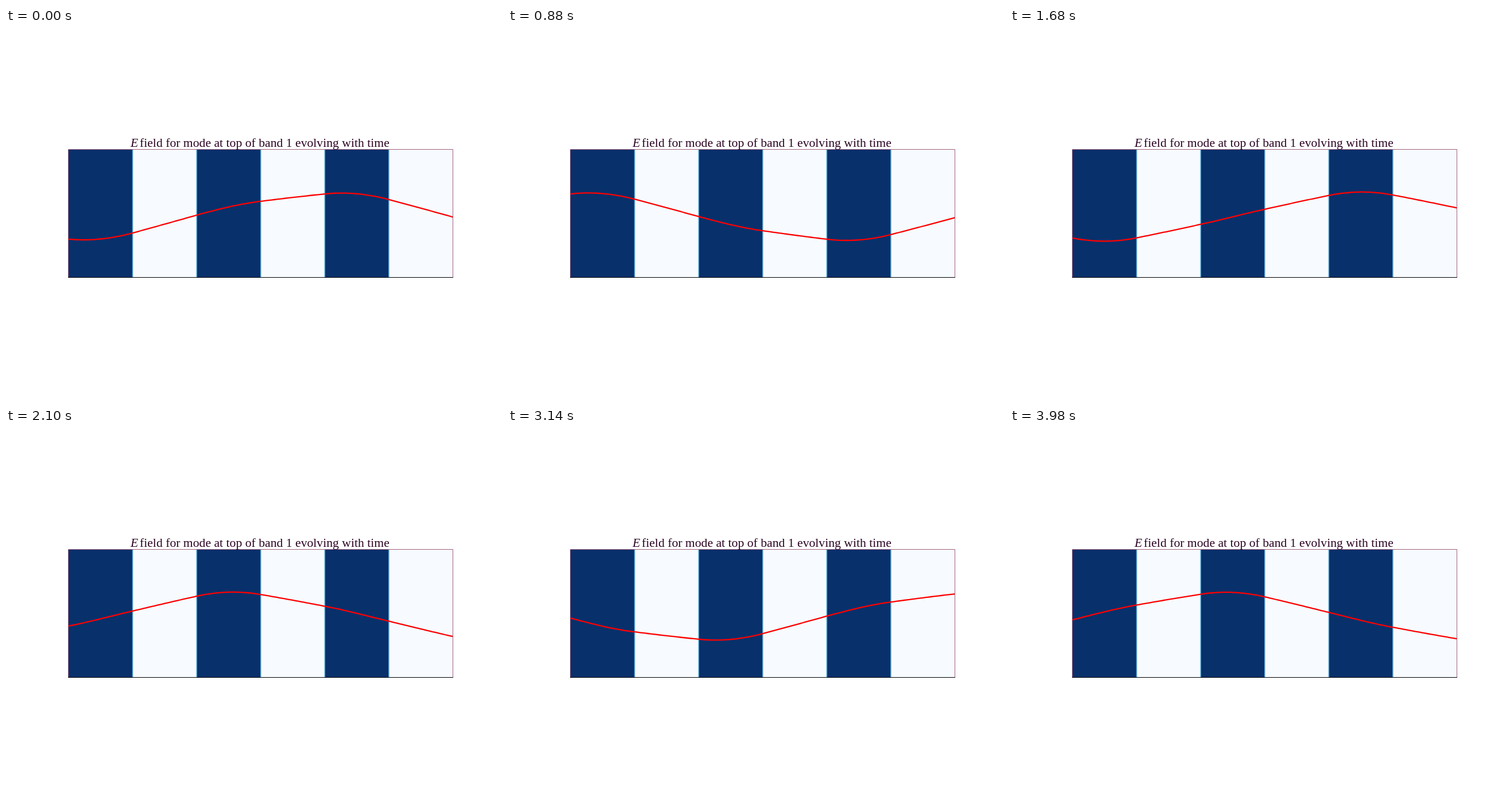
Animation, 864 px wide and 648 px high, one loop 4000 ms. Source, as an HTML page:

```html
<!DOCTYPE html>
<html>
<head>
<meta charset="utf-8">
<style>
html, body { margin: 0; width: 100%; height: 100%; overflow: hidden; background: #fff; }
svg { display: block; }
text { font: 21.7px "Liberation Serif", "Times New Roman", serif; fill: #2c0424; }
.it { font-style: italic; }
</style>
</head>
<body>
<svg width="864" height="648" viewBox="0 0 864 648">
  <rect x="108.8" y="211" width="669.5" height="223.5" fill="#f7fbff"/>
  <g id="layers"></g>
  <path id="wave" fill="none" stroke="#f00" stroke-width="2.3" stroke-linejoin="round"/>
  <path d="M108.5 434V211.5H778.5V434" fill="none" stroke="#a0607c"/>
  <path d="M108 434.5H779" stroke="#000"/>
  <text y="206.5"><tspan x="217" class="it">E</tspan><tspan x="233">field for mode at top of band 1 evolving with time</tspan></text>
</svg>
<script>
const LEFT = 109, LAYER = 111.58, MID = 328.5;
const LOOP = 4000, STEP = 20, OMEGA = 3.495, START = -1.169;
const BLOCH = 1.549;             // phase gained per pair of layers
const Q_DARK = 1.032, Q_LIGHT = 0.286; // phase across one layer
const EVEN = 42.8, ODD = 26.55;  // amplitudes about a dark layer's centre

const layers = document.getElementById('layers');
const wave = document.getElementById('wave');

function bar(x, width, fill) {
  const r = document.createElementNS('http://www.w3.org/2000/svg', 'rect');
  const attrs = { x, y: 211, width, height: 223.5, fill };
  for (const name in attrs) r.setAttribute(name, attrs[name]);
  layers.append(r);
}

for (let i = 0; i < 6; i += 2) bar(LEFT + i * LAYER, LAYER, '#08306b');
for (let i = 1; i < 6; i++) bar(LEFT + i * LAYER - 0.8, 1.6, '#5ba3d0');

// Field in a dark layer, s from 0 to 1 across it
function dark(phase, s) {
  const u = Q_DARK * (s - 0.5);
  return EVEN * Math.cos(u) * Math.cos(phase) - ODD * Math.sin(u) * Math.sin(phase);
}

// A light layer joins the ends of its dark neighbours
function light(phase, s) {
  const a = dark(phase, 1), b = dark(phase + BLOCH, 0);
  return (a * Math.sin(Q_LIGHT * (1 - s)) + b * Math.sin(Q_LIGHT * s)) / Math.sin(Q_LIGHT);
}

function draw(ms) {
  const theta = START + OMEGA * ms / 1000;
  const points = [];
  for (let i = 0; i < 6; i++) {
    const phase = theta + (Math.floor(i / 2) - 1) * BLOCH;
    const field = i % 2 ? light : dark;
    for (let n = 0; n <= 24; n++) {
      const s = n / 24;
      points.push((LEFT + (i + s) * LAYER).toFixed(2) + ' ' + (MID - field(phase, s)).toFixed(2));
    }
  }
  wave.setAttribute('d', 'M' + points.join('L'));
}

const begin = performance.now();
function tick() {
  const t = (performance.now() - begin) % LOOP;
  draw(Math.floor(t / STEP) * STEP);
  requestAnimationFrame(tick);
}
tick();
</script>
</body>
</html>
```
